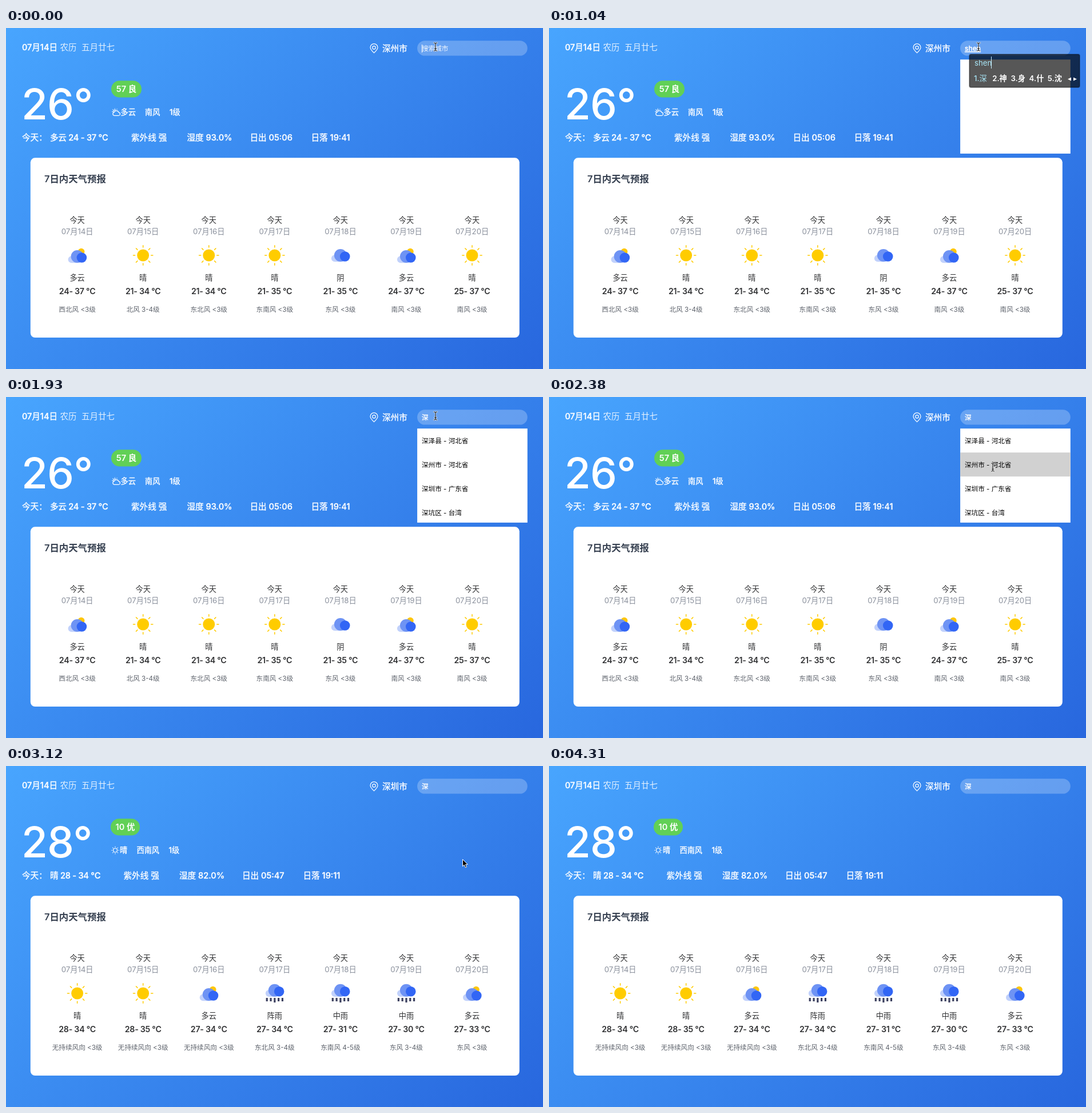
Animation of 939x597 px, one loop 4.46 s. Source, as an HTML page:

```html
<!DOCTYPE html>
<html lang="zh-CN">
<head>
<meta charset="utf-8">
<title>天气预报</title>
<style>
html, body { margin: 0; width: 100%; height: 100%; overflow: hidden; }
body { background: linear-gradient(135deg, #48a5fe, #2867de); }
svg { display: block; width: 939px; height: 597px; }
text { font-family: Inter, "Noto Sans CJK SC", "Noto Sans CJK", sans-serif; white-space: pre; }
</style>
</head>
<body>
<svg id="stage" viewBox="0 0 939 597" xmlns="http://www.w3.org/2000/svg"></svg>
<script>
const LOOP = 4460;
const stage = document.getElementById('stage');

const CITIES = [
  {
    name: '深州市', temp: '26°', level: '57 良', badge: [184, 53],
    icon: 'cloudy', now: [['多云', 200.5], ['南风', 243], ['1级', 286]],
    today: [['今天：', 28], ['多云 24 - 37 °C', 77, -.25], ['紫外线 强', 219], ['湿度 93.0%', 316.5],
      ['日出 05:06', 426.5], ['日落 19:41', 533.5]],
    days: ['多云|24- 37|西北风 <3级', '晴|21- 34|北风 3-4级', '晴|21- 34|东北风 <3级', '晴|21- 35|东南风 <3级',
      '阴|21- 35|东风 <3级', '多云|24- 37|南风 <3级', '晴|25- 37|南风 <3级']
  },
  {
    name: '深圳市', temp: '28°', level: '10 优', badge: [183, 51],
    icon: 'sunny', now: [['晴', 199], ['西南风', 228.5], ['1级', 284.5]],
    today: [['今天：', 28], ['晴 28 - 34 °C', 77, -.25], ['紫外线 强', 205.5], ['湿度 82.0%', 303],
      ['日出 05:47', 413], ['日落 19:11', 519.5]],
    days: ['晴|28- 34|无持续风向 <3级', '晴|28- 35|无持续风向 <3级', '多云|27- 34|无持续风向 <3级', '阵雨|27- 34|东北风 3-4级',
      '中雨|27- 31|东南风 4-5级', '中雨|27- 30|东风 3-4级', '多云|27- 33|东风 <3级']
  }
];

const MATCHES = ['深泽县 - 河北省', '深州市 - 河北省', '深圳市 - 广东省', '深坑区 - 台湾'];

const IME = {
  s: { width: 192, words: '是说上三岁' },
  she: { width: 196, words: '设社射蛇舍' },
  shen: { width: 193, words: '深神身什沈' }
};

// Each step changes part of the state and holds until the next one.
const STEPS = [
  [0, { city: 0, typed: '', caret: 727, cursor: [beam, 751, 33] }],
  [450, { caret: 0 }],
  [740, { typed: 's', ime: true, open: true, list: true }],
  [890, { typed: 'she', list: false }],
  [1040, { typed: 'shen' }],
  [1490, { typed: '深', ime: false, caret: 739 }],
  [1640, { list: true }],
  [1930, { caret: 0 }],
  [2230, { row: 0, cursor: [beam, 763, 74] }],
  [2380, { row: 1, cursor: [beam, 776, 123] }],
  [2530, { row: 2, cursor: [beam, 776, 155], caret: 739 }],
  [2680, { cursor: [beam, 776.5, 158.5], caret: 0 }],
  [2830, { cursor: [beam, 780, 158.5] }],
  [2980, { city: 1, loading: true }],
  [3120, { loading: false, open: false, cursor: [arrow, 798.5, 163.5] }],
  [3420, { cursor: [arrow, 796.5, 168] }],
  [3570, { cursor: [arrow, 798.5, 260.5] }],
  [3720, { cursor: [arrow, 829.5, 424.5] }],
  [3870, { cursor: [arrow, 874.5, 530.5] }],
  [4020, { cursor: [arrow, 893.5, 555.5] }],
  [4160, { cursor: [arrow, 904.5, 590.5] }],
  [4310, { cursor: null }]
];

const esc = s => s.replace(/</g, '&lt;');
const text = (s, x, y, size, fill = '#fff', weight = 400, more = '') =>
  `<text x="${x}" y="${y}" font-size="${size}" fill="${fill}" font-weight="${weight}" ${more}>${esc(s)}</text>`;
const mid = (s, x, y, size, fill, weight, more = '') =>
  text(s, x, y, size, fill, weight, 'text-anchor="middle" ' + more);
// A hairline stroke gives the Chinese glyphs a medium weight.
const medium = (s, x, y, size, more = '') =>
  text(s, x, y, size, '#fff', 500, 'stroke="#fff" stroke-width=".35" ' + more);
const rect = (x, y, w, h, fill, more = '') =>
  `<rect x="${x}" y="${y}" width="${w}" height="${h}" fill="${fill}" ${more}/>`;
const dot = (x, y, r, fill) => `<circle cx="${x}" cy="${y}" r="${r}" fill="${fill}"/>`;
const line = (d, stroke, width, more = '') =>
  `<path d="${d}" fill="none" stroke="${stroke}" stroke-width="${width}" stroke-linecap="round" stroke-linejoin="round" ${more}/>`;
const at = (x, y, body) => `<g transform="translate(${x} ${y})">${body}</g>`;

function rays(inner, outer) {
  let d = '';
  for (let i = 0; i < 8; i++) {
    const c = Math.cos(i * Math.PI / 4), s = Math.sin(i * Math.PI / 4);
    d += `M${(c * inner).toFixed(2)} ${(s * inner).toFixed(2)}L${(c * outer).toFixed(2)} ${(s * outer).toFixed(2)}`;
  }
  return d;
}

function cloud(dy) {
  return at(0, dy, rect(-16, -2, 24, 12, '#c1d1fb', 'rx="6"') +
    dot(0, -1.2, 11, '#6e93f4') + dot(7.8, .8, 8.8, '#3266f5'));
}

function rain() {
  let drops = '';
  for (let i = -2; i <= 2; i++) drops += rect(i * 6.8 - 1.6, 8, 3.2, i ? 6 : 8, '#3d4160');
  return cloud(-4) + drops;
}

const sun = () => dot(0, 0, 10.5, '#ffcc00') + line(rays(14, 17.2), '#ffcc00', 1.5);

const DAY_ICONS = {
  晴: sun,
  多云: () => dot(7, -6.5, 5.8, '#ffc60a') + cloud(3.2),
  阴: () => cloud(1.2),
  阵雨: rain,
  中雨: rain
};

const NOW_ICONS = {
  cloudy: line('M189 153.3h7.6a2.7 2.7 0 0 0 .4-5.4a4 4 0 0 0-7.6-.6a3.1 3.1 0 0 0-.4 6z', '#fff', 1.2) +
    line('M187.7 147.3a3.2 3.2 0 0 1 4-3.8M190.2 141v.6M186.8 142.9l.4 .4M185.8 146.4h.4M193.8 142.4l.3-.4', '#fff', 1.1),
  sunny: at(191, 147.5, `<circle r="3.5" fill="none" stroke="#fff" stroke-width="1.2"/>` + line(rays(5.7, 6.3), '#fff', 1.2))
};

function beam() {
  const d = 'M-2.7 -7Q-.3 -7 0 -5.6Q.3 -7 2.7 -7M0 -5.6V5.6M-2.7 7Q-.3 7 0 5.6Q.3 7 2.7 7M-1.6 3.2H1.6';
  return line(d, '#fff', 2.6, 'opacity=".75"') + line(d, '#111', 1.1);
}

function arrow() {
  return '<path d="M0 0V12.2L2.8 9.6L4.8 14.2L6.9 13.3L5 8.8H8.8Z" fill="#000" stroke="#fff" stroke-width="1" stroke-linejoin="round"/>';
}

function header(city) {
  return medium('07月14日', 28, 38.6, 14.5) +
    text('农历', 94.5, 38.6, 14.5, '#fff', 400, 'opacity=".85"') +
    text('五月廿七', 132, 38.6, 14.5, '#fff', 400, 'opacity=".85"') +
    line('M643.5 43.6C639.5 40 637 37.3 637 34.1a6.5 6.5 0 0 1 13 0C650 37.3 647.5 40 643.5 43.6z', '#fff', 1.2) +
    `<circle cx="643.5" cy="34.4" r="2.7" fill="none" stroke="#fff" stroke-width="1.2"/>` +
    medium(city.name, 658, 41.3, 14.6);
}

function summary(city, loading) {
  const [x, w] = city.badge;
  return text(city.temp, 27, 159.5, 74.5, '#fff', 500, 'letter-spacing="-.8"') +
    rect(x, 92.2, w, 29.4, '#61d056', 'rx="14.7"') +
    mid(city.level, x + w / 2, 112.4, 14.5, '#fff', 600) +
    (loading ? '' : NOW_ICONS[city.icon]) +
    city.now.map(([s, px]) => medium(s, px, 152.4, 13.2)).join('') +
    city.today.map(([s, px, gap = 0]) => medium(s, px, 196.8, 14.6, `letter-spacing="${gap}"`)).join('');
}

function forecast(city, loading) {
  const days = city.days.map((day, i) => {
    const [sky, range, wind] = day.split('|');
    const x = 124.6 + i * 115.07;
    const hidden = loading && sky.endsWith('雨');
    return mid('今天', x, 341, 13.2, '#303133') +
      mid(`07月${14 + i}日`, x, 360.8, 13.2, '#8a909c') +
      (hidden ? '' : at(x, 398, DAY_ICONS[sky]())) +
      mid(sky, x, 441.8, 13.2, '#303133') +
      mid(range + ' °C', x, 466, 14.2, '#303133', 600, 'letter-spacing="-.25"') +
      mid(wind, x, 496.5, 11.6, '#5f646d');
  });
  return rect(42.8, 227.3, 855, 314.7, '#fff', 'rx="8"') +
    text('7日内天气预报', 67, 270.2, 16.4, '#374151', 600) + days.join('');
}

function search({ typed, ime, caret }) {
  return rect(719.1, 22.2, 192.7, 26.4, '#fff', 'rx="13.2" fill-opacity=".24"') +
    (typed
      ? medium(typed, 727, 40, ime ? 12 : 11.6, ime ? 'text-decoration="underline"' : '')
      : text('搜索城市', 727, 40, 11.6, '#fff', 400, 'opacity=".9"')) +
    (caret ? rect(caret, typed ? 28 : 29, 1, 14, '#fff') : '');
}

function dropdown({ open, list, row }) {
  if (!open) return '';
  return rect(719.1, 55.2, 192.7, 164.7, '#fff') +
    (row >= 0 ? rect(719.1, 55.2 + row * 42, 192.7, 42, '#d1d1d1') : '') +
    (list ? MATCHES.map((s, i) => text(s, 727, 80.8 + i * 42, 11.6, '#000')).join('') : '');
}

function popup({ ime, typed }) {
  if (!ime) return '';
  const { width, words } = IME[typed];
  const end = 735 + width;
  const caretX = 744.5 + [7, 14.7, 22.3, 28.5][typed.length - 1];
  return rect(735, 46, width, 58, '#000', 'rx="3" fill-opacity=".66" stroke="#000" stroke-opacity=".3" stroke-width="2"') +
    text(typed, 744, 66, 13.2, '#a9e6f7') +
    rect(caretX, 50, 1, 21, '#c9eefa') +
    [...words].map((w, i) =>
      text(`${i + 1}.${w}`, 743 + i * 32.2, 92.5, 13.2, i ? '#fff' : '#a9e6f7', i ? 600 : 500)).join('') +
    `<path d="M${end - 15} 86.5v6l-6 -3zM${end - 11} 86.5v6l6 -3z" fill="#fff"/>`;
}

function pointer({ cursor }) {
  if (!cursor) return '';
  const [shape, x, y] = cursor;
  return at(x, y, shape());
}

function draw(state) {
  const city = CITIES[state.city];
  stage.innerHTML = header(city) + summary(city, state.loading) + forecast(city, state.loading) +
    search(state) + dropdown(state) + popup(state) + pointer(state);
}

const start = performance.now();
let shown = -1;

function tick() {
  const t = (performance.now() - start) % LOOP;
  const index = STEPS.filter(([when]) => when <= t).length - 1;
  if (index !== shown) {
    shown = index;
    draw(Object.assign({}, ...STEPS.slice(0, index + 1).map(step => step[1])));
  }
  requestAnimationFrame(tick);
}
tick();
</script>
</body>
</html>
```
